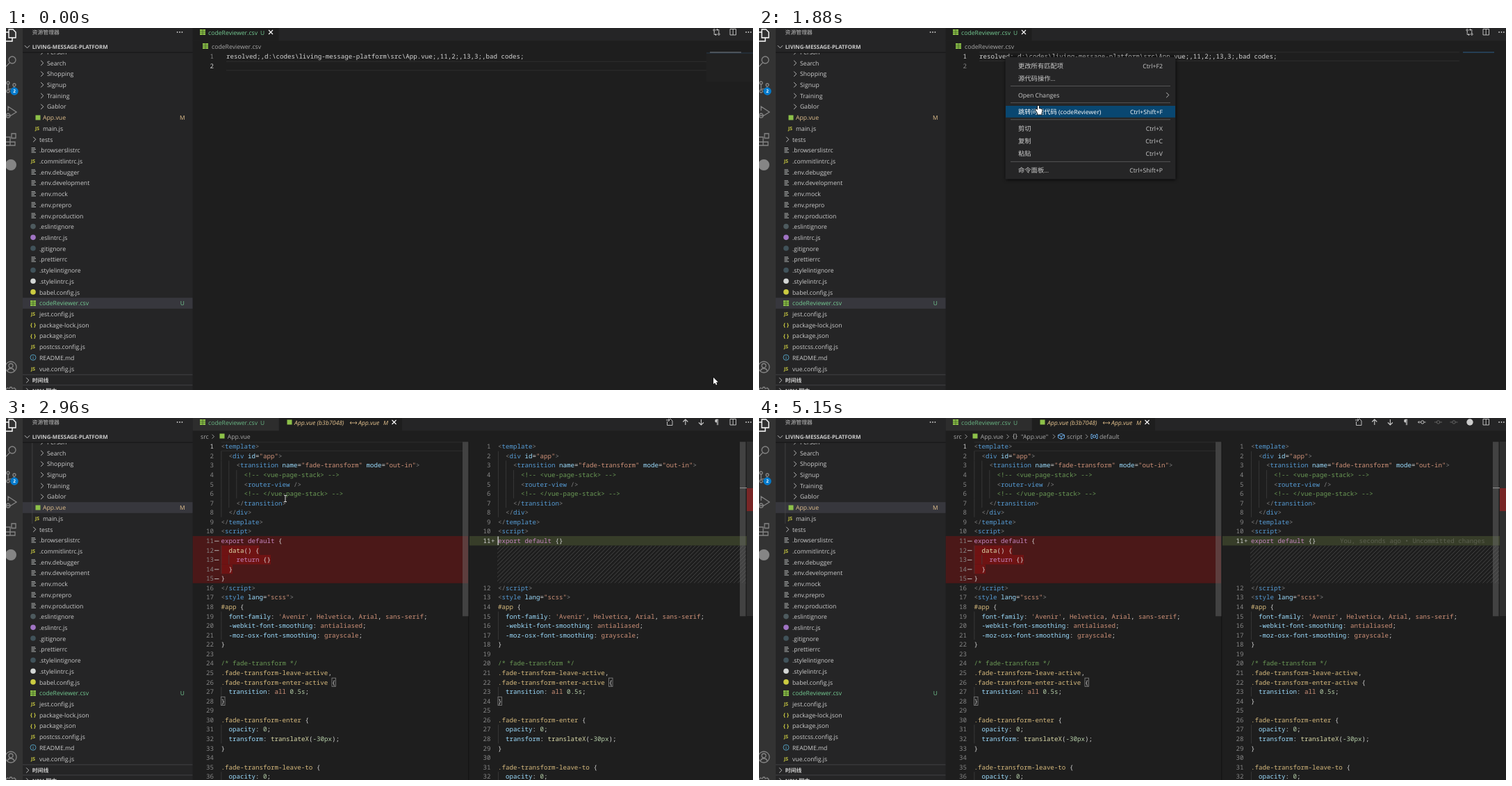
Write an HTML page with a canvas that moves like this. It is 1075 by 521 pixels and loops after 5300 ms.

```html
<!DOCTYPE html>
<html lang="zh">
<head>
<meta charset="utf-8">
<title>Code review jump</title>
<style>
html, body { margin: 0; width: 100%; height: 100%; overflow: hidden; background: #1e1e1e; }
canvas { display: block; }
</style>
</head>
<body>
<canvas id="stage" width="1075" height="521"></canvas>
<script>
const ctx = document.getElementById('stage').getContext('2d');
const LOOP = 5300, ROW = 13.571, CHAR = 5.5, TREE_ROW = 15.714;
const FG = '#cccccc', GREEN = '#73c991', GOLD = '#e2c08d', LEAF = '#8dc149', YELLOW = '#cbcb41', SLATE = '#41535b';
const MONO = '9.17px "Noto Sans Mono", "DejaVu Sans Mono", monospace';
ctx.textRendering = 'geometricPrecision';

const ICONS = {
  files: 'M-3-8H3L7-4V4H-3ZM-3-4H-9V9H2V4',
  search: 'M7-2A5 5 0 1 1-3-2A5 5 0 1 1 7-2M-1.5 1.6L-7 7.5',
  branch: 'M-2-6a2 2 0 1 1-4 0a2 2 0 1 1 4 0M-4-4V4M-2 6a2 2 0 1 1-4 0a2 2 0 1 1 4 0M7-3a2 2 0 1 1-4 0a2 2 0 1 1 4 0M5-1Q5 3-3 3',
  debug: 'M-4-2V-8L8 0L0 5M-1 5a3 3 0 1 1-6 0a3 3 0 1 1 6 0M-8 5H0',
  extensions: 'M-9-3H-1V4H6V9H-9ZM-9 4H-1V9M1-8H7V-1.5H1Z',
  account: 'M8 0A8 8 0 1 1-8 0A8 8 0 1 1 8 0M3-2A3 3 0 1 1-3-2A3 3 0 1 1 3-2M-5 6Q-4 2 0 2T5 6',
  gear: 'M3 0A3 3 0 1 1-3 0A3 3 0 1 1 3 0M-2-6L-1-8H1L2-6L5-7L7-5L6-2M-2-6L-5-7L-7-5L-6-2',
  compare: 'M-2-3a1.3 1.3 0 1 1-2.6 0a1.3 1.3 0 1 1 2.6 0M-3.3-1.7V3.5H0M-1.5 2L0 3.5L-1.5 5M4.6 3a1.3 1.3 0 1 1-2.6 0a1.3 1.3 0 1 1 2.6 0M3.3 1.7V-3.5H0M1.5-5L0-3.5L1.5-2',
  goFile: 'M-3.5-1V4.5H4V-2L1.5-4.5H0M-5-3H0M-2-5L0-3L-2-1',
  up: 'M0 4V-4M-3.5-.5L0-4L3.5-.5',
  down: 'M0-4V4M-3.5.5L0 4L3.5.5',
  split: 'M-4-4.5H4.5V4H-4ZM.2-4.5V4',
  commit: 'M2.2 0A2.2 2.2 0 1 1-2.2 0A2.2 2.2 0 1 1 2.2 0M-5.5 0H-2.2M2.2 0H5.5',
  back: 'M3 0A2.2 2.2 0 1 1-1.4 0A2.2 2.2 0 1 1 3 0M-1.4 0H-5.5M-3.8-1.7L-5.5 0L-3.8 1.7M3 0H5.5',
  right: 'M-1.8-3.6L1.8 0L-1.8 3.6',
  crumb: 'M-1.5-3L1.5 0L-1.5 3',
  expanded: 'M-3.6-1.8L0 1.8L3.6-1.8',
  cross: 'M-3-3L3 3M3-3L-3 3',
  both: 'M-5 0H5M-3-1.8L-5 0L-3 1.8M3-1.8L5 0L3 1.8',
  list: 'M-3-3H2.5M-3-.9H3.5M-3 1.2H1.5M-3 3.3H3.5',
  grid: 'M-4-1.3H4M-4 1.3H4M0-4V4',
  cube: 'M0-4L4.5-2V2L0 4L-4.5 2V-2ZM-4.5-2L0 0L4.5-2M0 0V4',
  field: 'M-2.5-3H-4.5V3H-2.5M2.5-3H4.5V3H2.5M-2-1.5H2V1.5H-2Z',
  info: 'M4 0A4 4 0 1 1-4 0A4 4 0 1 1 4 0M0-.5V2.3M0-2.2V-1.4',
  beam: 'M-2-4.5H2M0-4.5V4.5M-2 4.5H2',
  arrow: 'M0 0V9.5L2.2 7.5L3.9 10.8L5.4 10L3.9 6.8H6.8Z',
  hand: 'M-1 0V6L-3.2 4.6L-4 6L-1 10.5V12.5H4.5V10.5L5.6 5.4L4 4.4L1 4V0Z'
};
for (const key in ICONS) ICONS[key] = new Path2D(ICONS[key]);

const TREE = [
  ['folder2', 'Person'], ['folder2', 'Search'], ['folder2', 'Shopping'], ['folder2', 'Signup'], ['folder2', 'Training'],
  ['folder2', 'Gablor'], ['vue', 'App.vue'], ['js1', 'main.js'], ['folder', 'tests'], ['list', '.browserslistrc'],
  ['js', '.commitlintrc.js'], ['list', '.env.debugger'], ['list', '.env.development'], ['list', '.env.mock'],
  ['list', '.env.prepro'], ['list', '.env.production'], ['#4d5a5e', '.eslintignore'], ['#a074c4', '.eslintrc.js'],
  [SLATE, '.gitignore'], ['list', '.prettierrc'], [SLATE, '.stylelintignore'], ['#d4d7d6', '.stylelintrc.js'],
  [YELLOW, 'babel.config.js'], ['csv', 'codeReviewer.csv'], ['js', 'jest.config.js'], ['braces', 'package-lock.json'],
  ['braces', 'package.json'], ['js', 'postcss.config.js'], ['info', 'README.md'], ['js', 'vue.config.js']
];

const MENU = [
  [54.5, '更改所有匹配项', 'Ctrl+F2'], [72.5, '源代码操作...', ''], [97, 'Open Changes', ''],
  [120.5, '跳转问题代码 (codeReviewer)', 'Ctrl+Shift+F'], [145, '剪切', 'Ctrl+X'], [162.8, '复制', 'Ctrl+C'],
  [181, '粘贴', 'Ctrl+V'], [205, '命令面板...', 'Ctrl+Shift+P']
];

const OLD = `<template>
  <div id="app">
    <transition name="fade-transform" mode="out-in">
      <\!-- <vue-page-stack> -->
      <router-view />
      <\!-- </vue-page-stack> -->
    </transition>
  </div>
</template>
<\script>
export default {
  data() {
    return {}
  }
}
<\/script>
<style lang="scss">
#app {
  font-family: 'Avenir', Helvetica, Arial, sans-serif;
  -webkit-font-smoothing: antialiased;
  -moz-osx-font-smoothing: grayscale;
}

/* fade-transform */
.fade-transform-leave-active,
.fade-transform-enter-active {
  transition: all 0.5s;
}

.fade-transform-enter {
  opacity: 0;
  transform: translateX(-30px);
}

.fade-transform-leave-to {
  opacity: 0;`.split('\n');
const NEW = [...OLD.slice(0, 10), 'export default {}', '', '', '', '', ...OLD.slice(15)];

// Each capture group has the colour of the same index.
const TOKEN = /(<\!--.*?-->|\/\*.*?\*\/)|('[^']*'|"[^"]*")|(<\/?|\/?>)|((?<=<\/?)[\w-]+)|([\w-]+(?=[:=]))|([#.][a-z][\w-]+)|(export|default|return)|(\w+(?=\())|(-?\d[\d.]*(?:px|s)?)|([\w-]+)|([^\s\w])/g;
const COLORS = ['#6a9955', '#ce9178', '#808080', '#569cd6', '#9cdcfe', '#d7ba7d', '#c586c0', '#dcdcaa', '#b5cea8', '#ce9178', '#d4d4d4'];

// Pointer: start time, x, y, shape
const POINTER = [
  [0, 1018, 503, 'arrow'], [120, 985, 455, 'beam'], [280, 880, 345, 'beam'], [440, 740, 235, 'beam'],
  [600, 580, 140, 'beam'], [760, 440, 80, 'beam'], [920, 370, 48, 'beam'], [1080, 352, 41, 'beam'],
  [1390, 354, 43, 'arrow'], [1550, 377, 66, 'hand'], [1710, 391, 90, 'hand'], [1880, 402, 112, 'hand'],
  [2030, 402, 113, 'hand'], [2480, 402, 116, 'beam'], [3410, 430, 121, 'beam'], [3570, 462, 127, 'beam'],
  [3730, 495, 133, 'beam'], [3890, 545, 147, 'beam'], [4050, 607, 165, 'beam'], [4210, 740, 270, 'beam'],
  [4360, 860, 386, 'beam'], [4510, 920, 430, 'beam'], [4670, 972, 465, 'beam'], [4830, 1020, 492, 'beam'],
  [4990, 1056, 513, 'beam'], [5150, 0, 0, '']
];

const rowMid = row => 41 + ROW * row;
const rowTop = row => rowMid(row) - ROW / 2;

function rect(x, y, w, h, color) {
  ctx.fillStyle = color;
  ctx.fillRect(x, y, w, h);
}
function dot(x, y, r, color) {
  ctx.fillStyle = color;
  ctx.beginPath();
  ctx.arc(x, y, r, 0, 7);
  ctx.fill();
}
function icon(key, x, y, color = FG, width = 0.9, fill) {
  ctx.save();
  ctx.translate(x, y);
  ctx.strokeStyle = color;
  ctx.lineWidth = width;
  ctx.stroke(ICONS[key]);
  if (fill) {
    ctx.fillStyle = fill;
    ctx.fill(ICONS[key]);
  }
  ctx.restore();
}
function text(s, x, y, color = FG, size = 8.7, style = '') {
  ctx.fillStyle = color;
  for (const run of s.match(/[\u3000-\u9fff]+|[^\u3000-\u9fff]+/g) || []) {
    ctx.font = run[0] > '\u3000'
      ? `${style} ${size * 1.07}px "Noto Sans CJK SC", "Noto Sans CJK", sans-serif`
      : `${style} ${size}px "Open Sans", "Noto Sans", sans-serif`;
    ctx.fillText(run, x, y + size * 0.36);
    x += ctx.measureText(run).width;
  }
}
function aligned(align, ...args) {
  ctx.textAlign = align;
  text(...args);
  ctx.textAlign = 'left';
}
function mono(s, x, y, color) {
  ctx.font = MONO;
  ctx.fillStyle = color;
  ctx.fillText(s, x, y + 3.3);
}
function lineNumber(n, x, y, active) {
  ctx.textAlign = 'right';
  mono(n, x, y, active ? '#d0d0d0' : '#858585');
  ctx.textAlign = 'left';
}
function dots(x, y) {
  for (const dx of [-3.4, 0, 3.4]) dot(x + dx, y, 0.9, FG);
}
function csvIcon(x, y) {
  rect(x - 4, y - 4, 8, 8, LEAF);
  icon('grid', x, y, '#3c5724', 0.7);
}
const vueMark = (x, y) => rect(x - 3.5, y - 3.5, 7, 7, LEAF);

function activityBar() {
  rect(0, 0, 24, 521, '#333333');
  icon('files', 7, 10, '#fff', 1.4);
  const side = [['search', 48], ['branch', 85], ['debug', 121], ['extensions', 160], ['account', 488], ['gear', 525]];
  for (const [key, y] of side) icon(key, 7, y, '#858585', 1.3);
  dot(7, 197, 8, '#858585');
  dot(12, 91, 5.7, '#007acc');
  aligned('center', '2', 12, 91, '#fff', 6.5, 'bold');
}

function treeRow([kind, label], y, fileOpen) {
  const nested = kind === 'vue' || kind === 'js1';
  const x = kind === 'folder2' ? 59 : nested ? 53 : 48;
  const iconX = nested ? 45 : 39;
  if (label === (fileOpen ? 'App.vue' : 'codeReviewer.csv')) rect(24, y - 7.9, 244.5, TREE_ROW, '#37373d');
  if (kind.startsWith('folder')) icon('right', x - 7, y);
  else if (kind.startsWith('js')) aligned('center', 'JS', iconX, y, YELLOW, 6.8, 'bold');
  else if (kind === 'vue') vueMark(46, y);
  else if (kind === 'csv') csvIcon(39, y);
  else if (kind === 'list') icon('list', 39.5, y - 0.5, '#bfc2c1', 0.9);
  else if (kind === 'braces') aligned('center', '{ }', 39, y - 0.5, YELLOW, 7.6, 'bold');
  else if (kind === 'info') icon('info', 39, y - 0.5, '#519aba', 1);
  else dot(39, y - 0.5, 3.8, kind);
  const color = kind === 'vue' ? GOLD : kind === 'csv' ? GREEN : FG;
  text(label, x, y, color);
  if (color !== FG) aligned('center', kind === 'vue' ? 'M' : 'U', 253.7, y, color, 8.4);
}

function sidebar(fileOpen) {
  rect(24, 0, 244.5, 521, '#252526');
  ctx.save();
  ctx.beginPath();
  ctx.rect(24, 35, 245, 463);
  ctx.clip();
  TREE.forEach((item, i) => treeRow(item, 34.7 + TREE_ROW * i, fileOpen));
  if (fileOpen) rect(37.5, 36, 0.7, 116, '#4a4a4a');
  ctx.restore();
  rect(24, 34.5, 244.5, 1.5, '#1a1a1a');
  text('资源管理器', 37.5, 6.3, '#bbbbbb', 7.4);
  dots(250, 6);
  icon('expanded', 30.5, 27);
  text('LIVING-MESSAGE-PLATFORM', 37.7, 27, FG, 7.8, 'bold');
  for (const [y, label] of [[507, '时间线'], [522, 'NPM 脚本']]) {
    rect(24, y - 8.5, 244.5, 0.9, '#454547');
    icon('right', 31, y);
    text(label, 37.7, y, FG, 7.4, 'bold');
  }
}

function tabs(fileOpen) {
  rect(268.5, 0, 807, 18.3, '#252526');
  rect(268.5, 0, 124, 18.3, fileOpen ? '#2d2d2d' : '#1e1e1e');
  csvIcon(283, 6);
  const green = fileOpen ? '#68b583' : GREEN;
  text('codeReviewer.csv', 291, 6.5, green);
  text('U', 366, 6.5, green, 8.4);
  if (!fileOpen) return icon('cross', 381, 6, '#fff', 1.1);
  rect(393, 0, 177, 18.3, '#1e1e1e');
  vueMark(408, 6);
  text('App.vue (b3b7048)', 415, 6.5, GOLD, 8.7, 'italic');
  icon('both', 500, 7, GOLD, 0.8);
  text('App.vue', 507, 6.5, GOLD, 8.7, 'italic');
  text('M', 543, 6.5, GOLD, 8.4, 'italic');
  icon('cross', 558.5, 6, '#fff', 1.1);
}

function titleActions(t) {
  icon('split', 1046, 6);
  dots(1068.5, 6);
  if (t < 2800) return icon('compare', 1022.5, 6);
  if (t < 2960) return icon('goFile', 1023, 6);
  const annotated = t >= 4210, x = annotated ? 863 : 955;
  icon('goFile', x, 6);
  icon('up', x + 22.8, 6, FG, 1.1);
  icon('down', x + 45.4, 6, FG, 1.1);
  aligned('center', '¶', x + 67.8, 6, FG, 9.5, 'bold');
  if (!annotated) return;
  icon('back', 954, 6);
  icon('commit', 977.5, 6, '#6a6a6a');
  icon('commit', 1000, 6, '#6a6a6a');
  dot(1023, 6, 4.7, FG);
}

function breadcrumbs(t) {
  const gray = '#a9a9a9';
  if (t < 2800) {
    csvIcon(287, 26);
    return text('codeReviewer.csv', 296, 26.7, gray);
  }
  text('src', 280, 26.7, gray);
  icon('crumb', 298, 26.7, gray);
  vueMark(311, 26);
  text('App.vue', 318.7, 26.7, gray);
  if (t < 3410) return;
  for (const x of [358, 424.5, 471.5]) icon('crumb', x, 26.7, gray);
  text('{}', 365, 26.2, FG, 9);
  text('"App.vue"', 377, 26.7, gray);
  icon('cube', 435, 26.5, '#75beff');
  text('script', 443, 26.7, gray);
  icon('field', 482.5, 26.5, '#75beff');
  text('default', 490, 26.7, gray);
}

function currentLine(row, x, right) {
  for (const y of [rowTop(row), rowTop(row + 1) - 1]) rect(x, y, right - x, 1.2, '#2b2b2b');
}

function csvEditor(t) {
  const row = t < 1230 ? 1 : 0;
  currentLine(row, 317, 1008);
  lineNumber('1', 299, rowMid(0), row === 0);
  lineNumber('2', 299, rowMid(1), row === 1);
  mono('resolved;,d:\\codes\\living-message-platform\\src\\App.vue;,11,2;,13,3;,bad codes;', 317, rowMid(0), '#d4d4d4');
  if (row) {
    rect(1008, 35, 67, 42, '#212121');
    rect(1008, 35.5, 67, 1, '#263a4d');
  }
  rect(1013, 34.5, 45, 1, row ? '#7a8088' : '#2f5f8a');
}

function contextMenu(y) {
  ctx.save();
  ctx.shadowColor = '#000';
  ctx.shadowBlur = 5;
  rect(354.5, 42, 245, 175.5, '#252526');
  ctx.restore();
  for (const sep of [83.5, 107.7, 131.8, 192.3]) rect(362, sep - 0.4, 230, 0.8, '#606061');
  for (const [itemY, label, keys] of MENU) {
    const hover = y > 60 && Math.abs(y + 4 - itemY) < 8.5;
    if (hover) rect(355, itemY - 8.5, 244, 16.8, '#094771');
    const color = hover ? '#fff' : FG;
    text(label, 373, itemY, color);
    aligned('right', keys, 581, itemY, color);
  }
  icon('right', 588, 96.5);
}

function codePane(lines, x, numberOf, activeNumber) {
  lines.forEach((line, row) => {
    const y = rowMid(row), n = numberOf(row);
    if (n) lineNumber(String(n), x - 10.5, y, n === activeNumber);
    const indent = line.search(/\S/);
    for (let col = 0; col < indent; col += 2) rect(x + col * CHAR, rowTop(row), 0.7, ROW, '#404040');
    for (const m of line.matchAll(TOKEN)) {
      const kind = m.slice(1).findIndex(group => group !== undefined);
      mono(m[0], x + m.index * CHAR, y, COLORS[kind]);
    }
  });
}

function braceBoxes(x) {
  ctx.strokeStyle = '#888';
  ctx.lineWidth = 0.8;
  ctx.strokeRect(x + 29 * CHAR, rowTop(25) + 0.7, CHAR, ROW - 1.4);
  ctx.strokeRect(x, rowTop(27) + 0.7, CHAR, ROW - 1.4);
}

function hatch(x, y, w, h) {
  ctx.save();
  ctx.beginPath();
  ctx.rect(x, y, w, h);
  ctx.clip();
  ctx.beginPath();
  for (let dx = 0; dx < w + h; dx += 5.714) {
    ctx.moveTo(x + dx, y);
    ctx.lineTo(x + dx - h, y + h);
  }
  ctx.strokeStyle = 'rgba(204,204,204,.25)';
  ctx.lineWidth = 0.9;
  ctx.stroke();
  ctx.restore();
}

function diffEditor(t) {
  const left = 309.5, right = 708;
  if (t < 2960) {
    rect(664.5, 38, 2, 483, '#101010');
    return rect(1066, 107, 9, 21, '#7a1212');
  }
  currentLine(0, left, 657);
  rect(268.5, rowTop(10), 397, ROW * 5, '#4b1818');
  for (const row of [11, 12, 13]) rect(left, rowTop(row), OLD[row].length * CHAR, ROW, '#6f1313');
  rect(667, rowTop(10), 399, ROW, '#373d29');
  hatch(707, rowTop(11), 358, ROW * 4);
  codePane(OLD, left, row => row + 1, 1);
  codePane(NEW, right, row => row < 11 ? row + 1 : row < 15 ? 0 : row - 3, 11);
  for (let row = 10; row < 15; row++) rect(300, rowMid(row), 6.5, 0.9, '#c0c0c0');
  mono('+', 698, rowMid(10), '#c5c5c5');
  braceBoxes(left);
  if (t < 3100) braceBoxes(right);
  if (t >= 4210) mono('You, seconds ago • Uncommitted changes', 836, rowMid(10), '#5c6050');
  const caretOn = t < 3410 || (t >= 3890 && t < 4360) || (t >= 4830 && t < 5150);
  if (caretOn) rect(707.5, rowTop(10) + 0.5, 1.3, ROW - 1, '#d0d0d0');
  rect(665, 34, 1.5, 487, '#151515');
  for (const x of [657, 1056]) rect(x, 34.3, 8.5, 251, 'rgba(121,121,121,.4)');
  rect(1066, 34, 9, 251, '#2f2f2f');
  rect(1066, 101, 9, 33, '#782626');
  rect(1056, 100, 10, 1.2, '#8a8a8a');
}

function pointer(x, y, shape) {
  if (shape === 'beam') icon('beam', x, y, '#d4d4d4', 1);
  else if (shape) icon(shape, x, y, '#111', 1.4, '#fff');
}

function draw(t) {
  const [, x, y, shape] = POINTER.findLast(p => p[0] <= t);
  rect(0, 0, 1075, 521, '#1e1e1e');
  if (t < 2800) csvEditor(t);
  else diffEditor(t);
  tabs(t >= 2800);
  titleActions(t);
  breadcrumbs(t);
  sidebar(t >= 2960);
  activityBar();
  if (t >= 1390 && t < 2330) contextMenu(y);
  pointer(x, y, shape);
}

const startTime = performance.now();
function tick() {
  draw((performance.now() - startTime) % LOOP);
  requestAnimationFrame(tick);
}
tick();
</script>
</body>
</html>
```
